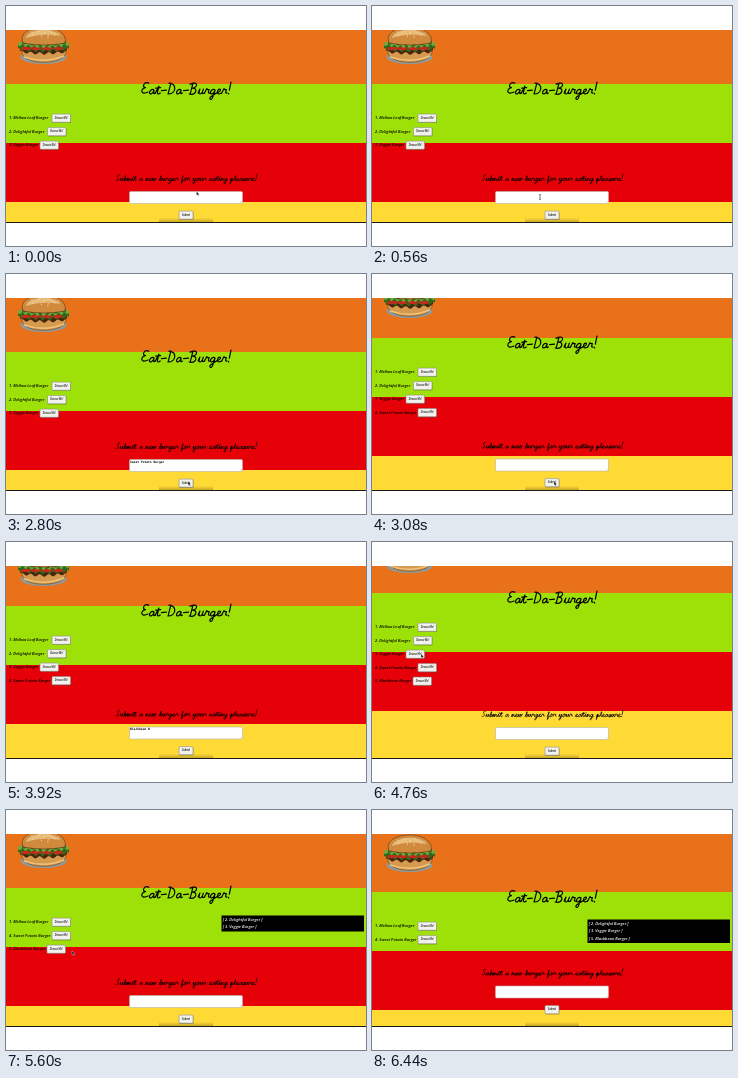
An HTML page with a canvas that plays this animation: 360x240 px, repeating every 6720 ms.

```html
<!DOCTYPE html>
<html lang="en">
<head>
<meta charset="utf-8">
<title>Eat-Da-Burger!</title>
<style>
  html, body { margin: 0; width: 100%; height: 100%; overflow: hidden; background: #fff; }
  canvas { display: block; width: 100vw; height: 100vh; }
</style>
</head>
<body>
<canvas id="stage" role="img" aria-label="Eat-Da-Burger! Submit a new burger for your eating pleasure!"></canvas>
<script>
const W = 360, H = 240, STEP = 280, STEPS = 24;
const ROW = 13.5;
const canvas = document.getElementById('stage');
const ctx = canvas.getContext('2d');
const dpr = window.devicePixelRatio || 1;
canvas.width = W * dpr;
canvas.height = H * dpr;

const SANS = '"Open Sans", "Noto Sans", sans-serif';
const MONO = '"DejaVu Sans Mono", monospace';

// Each burger is listed from step "from" and devoured at step "to".
const burgers = [
  { name: 'Mellow Leaf Burger', x: 46, from: 0, to: 99 },
  { name: 'Delightful Burger', x: 41.5, from: 0, to: 20 },
  { name: 'Veggie Burger', x: 34, from: 0, to: 18 },
  { name: 'Sweet Potato Burger', x: 46, from: 11, to: 99 },
  { name: 'Blackbean Burger', x: 41, from: 17, to: 22 }
].map((b, i) => ({ ...b, label: `${i + 1}. ${b.name}` }));

// Pen strokes of the handwriting: x-height 5, capitals 12, baseline 0.
const cup = 'M0-1L1.5-5Q0 0 2 0';
const bowl = 'M5-4C3-6 0-3 .6-1S4 0 5-4';
const tail = 'L3 4C2 7-1 5 1 3L6.5-1';
const rise = 'M0-1C4-5 4-11 2.5-9';
const hump = 'M0-1L1.5-5L1 0Q4-7 4.5-4';
const pen = {
  a: [6.5, bowl + 'Q4 1 6.5-1'],
  b: [5.5, rise + 'L1.5 0C5 1 5-5 3-4L5.5-3'],
  e: [5.5, 'M0-1C4-2 5-5 3-5S0 0 3 0L5.5-1'],
  f: [5, rise + 'L1 5Q4 2 2 0L5-1'],
  g: [6.5, bowl + tail],
  i: [4, 'M0-1L2-5Q0 1 4-1M2.5-7.2v.5'],
  l: [4, rise + 'Q0 1 4-1'],
  m: [9, hump + 'L3.5 0Q6-7 7-4Q5 1 9-1'],
  n: [6, hump + 'Q3 1 6-1'],
  o: [6, 'M3-5C0-5 0 0 2 0S5-4 3-5Q5-3 6-4'],
  p: [6, 'M0-1L2-5L.5 5L2-4C6-6 5 1 1.5-1L6-1'],
  r: [5.5, 'M0-1L2-5.5Q2.5-4 4.5-4.5Q3 0 5.5-1'],
  s: [5, 'M0-1L3-5Q5 1 1 0L5-1'],
  t: [5, 'M0-1L3-8L2-1Q3 1 5-1M0-6L5-6.5'],
  u: [6.5, cup + 'T5-5Q3 1 6.5-1'],
  w: [8, cup + 'T4.5-5Q3 0 5 0T7-5L8-4'],
  y: [6.5, cup + 'T5-5' + tail],
  B: [9, 'M3-11L1 0M0-10C9-14 8-6 3-6C9-6 7 2 0 0'],
  D: [9, 'M3-11L1 0C9 0 10-10 1-11'],
  E: [8, 'M7-11C2-13 0-7 4-6.5C-1-6-1 2 7-2'],
  S: [7, 'M6-10C3-13 1-8 3-6S4 1 0-1'],
  '-': [7, 'M1-3.5L6-4'],
  '!': [4, 'M3-12L2-4M1.5-.6v.5'],
  ' ': [5, '']
};
for (const k in pen) pen[k] = { w: pen[k][0], path: new Path2D(pen[k][1]) };

function handwrite(str, cx, y, width, line) {
  const natural = [...str].reduce((sum, c) => sum + pen[c].w, 0);
  const k = width / natural;
  ctx.save();
  ctx.translate(cx - width / 2, y);
  ctx.transform(k, 0, -0.08 * k, k, 0, 0);
  ctx.strokeStyle = '#000';
  ctx.lineWidth = line / k;
  ctx.lineCap = ctx.lineJoin = 'round';
  for (const c of str) {
    ctx.stroke(pen[c].path);
    ctx.translate(pen[c].w, 0);
  }
  ctx.restore();
}

function rect(x, y, w, h, fill) {
  ctx.fillStyle = fill;
  ctx.fillRect(x, y, w, h);
}

function text(str, x, y, font, fill = '#000', align = 'left') {
  ctx.font = font;
  ctx.fillStyle = fill;
  ctx.textAlign = align;
  ctx.textBaseline = 'middle';
  ctx.fillText(str, x, y);
}

function box(x, y, w, h, r, fill, stroke) {
  ctx.beginPath();
  ctx.roundRect(x, y, w, h, r);
  ctx.fillStyle = fill;
  ctx.fill();
  ctx.strokeStyle = stroke;
  ctx.lineWidth = 0.6;
  ctx.stroke();
}

function button(label, x, y, w) {
  rect(x + 0.4, y + 0.6, w, 8.2, 'rgba(0,0,0,.3)');
  box(x, y, w, 8.2, 0.8, '#f1f1ee', '#8d8b86');
  text(label, x + w / 2, y + 4.2, `italic 600 2.5px ${SANS}`, '#111', 'center');
}

function shape(d, fill, stroke, line = 0.6) {
  const p = new Path2D(d);
  if (fill) { ctx.fillStyle = fill; ctx.fill(p); }
  if (stroke) { ctx.strokeStyle = stroke; ctx.lineWidth = line; ctx.stroke(p); }
}

function oval(x, y, rx, ry, fill, turn = 0) {
  ctx.beginPath();
  ctx.ellipse(x, y, rx, ry, turn, 0, 7);
  ctx.fillStyle = fill;
  ctx.fill();
}

// A layer of filling with a ruffled, sagging lower edge.
function ruffle(x0, x1, y, depth, period, fill) {
  ctx.beginPath();
  ctx.moveTo(x0, y);
  for (let x = x0; x <= x1; x += 0.5) {
    const sag = 2 * Math.sin(Math.PI * (x - x0) / (x1 - x0));
    ctx.lineTo(x, y + depth + sag + 1.2 * Math.sin(x * 2 * Math.PI / period));
  }
  ctx.lineTo(x1, y);
  ctx.closePath();
  ctx.fillStyle = fill;
  ctx.fill();
}

function drawBurger() {
  oval(37.5, 55, 23, 7, '#8f9a9c');
  shape('M16 49C14 64 61 64 60 49Z', '#d69a4e', '#6b4018');
  shape('M18 55Q38 62 58 54', null, '#efc27c', 1.4);
  ruffle(14, 61, 43, 6.5, 9, '#46250f');
  ruffle(12, 63, 42, 5, 7, '#2f6a1b');
  for (const x of [20, 30, 41, 52]) oval(x, 46.5, 5, 1.7, '#c42a1c');
  ruffle(12, 63, 40, 2.8, 6, '#74a83c');
  ruffle(16, 60, 39, 2, 8, '#33591a');
  shape('M17 41C13 31 24 25 38 25S61 32 59 41Q38 45 17 41Z', '#d08a3e', '#60350f');
  shape('M20 36C22 27 46 24 55 34Q37 30 20 36Z', '#e9bb78');
  for (let i = 0; i < 14; i++) {
    const a = i * 2.4, r = Math.sqrt(i / 14);
    oval(38 + 15 * r * Math.cos(a), 32 + 4 * r * Math.sin(a), 0.8, 0.4, '#f8e2b0', a);
  }
}

function drawEaten(list) {
  if (!list.length) return;
  rect(215.5, 109.5, 142.5, 1 + 7.5 * list.length, '#000');
  list.forEach((b, i) =>
    text(`[ ${b.label} ]`, 216.7, 113.8 + 7.5 * i, `italic 600 4px ${SANS}`, '#fff'));
}

function drawForm(y, typed) {
  handwrite('Submit a new burger for your eating pleasure!', 180.5, y - 0.7, 141, 0.7);
  box(123.5, y + 10, 113, 12, 1.2, '#fff', '#b5b2a8');
  shape(`M234.3 ${y + 21.3}l1.8-1.8`, null, '#999', 0.4);
  text(typed, 124, y + 12.6, `bold 3px ${MONO}`);
  button('Submit', 173, y + 29.6, 14);
}

function typedAt(s) {
  if (s < 11) {
    const n = s < 4 ? 0 : [2, 5, 10, 14][s - 4] ?? 19;
    return 'Sweet Potato Burger'.slice(0, n);
  }
  const n = s < 13 || s > 16 ? 0 : [5, 11, 16, 16][s - 13];
  return 'Blackbean Burger'.slice(0, n);
}

// Pointer stops: first step, last step, x, y, text beam or arrow.
const stops = [
  [0, 0, 190.5, 185.5], [1, 1, 180, 188], [2, 2, 168, 191, 'beam'],
  [3, 4, 166, 191, 'beam'], [5, 5, 165, 191, 'beam'],
  [9, 9, 182, 206], [10, 11, 182, 207.5], [12, 12, 175, 189, 'beam'],
  [15, 16, 182, 207.5], [17, 18, 49, 112], [19, 19, 51, 112],
  [20, 20, 66, 141], [21, 22, 50, 139]
];

function drawPointer(s) {
  const stop = stops.find(([a, b]) => s >= a && s <= b);
  if (!stop) return;
  const [, , x, y, kind] = stop;
  if (kind) shape(`M${x - 0.8} ${y - 2.4}h1.6m-.8 0v4.8m-.8 0h1.6`, null, '#222', 0.6);
  else shape(`M${x} ${y}v3.8l.9-.8l.7 1.5l.8-.4l-.7-1.4h1.2Z`, '#000', '#fff', 0.35);
}

// Soft shadow of the dock and the dark edge below the page.
function drawScreenEdge() {
  const shade = ctx.createLinearGradient(0, 212, 0, 216);
  shade.addColorStop(0, 'rgba(60,50,20,0)');
  shade.addColorStop(1, 'rgba(60,50,20,.3)');
  rect(153, 212, 54, 4, shade);
  rect(0, 216, W, 1, '#1d1b18');
}

function draw(s) {
  const left = burgers.filter(b => s >= b.from && s < b.to);
  const eaten = burgers.filter(b => s >= b.to);
  const growth = ROW * (left.length - 3);
  const scroll = Math.max(0, Math.round(4.3 + growth));

  ctx.setTransform(dpr, 0, 0, dpr, 0, 0);
  rect(0, 0, W, H, '#fff');
  ctx.save();
  ctx.beginPath();
  ctx.rect(0, 24, W, 192);
  ctx.clip();
  ctx.translate(0, -scroll);

  ['#e97119', '#9de108', '#e60008', '#ffd934'].forEach((c, i) =>
    rect(0, 23 + 59 * i, W, 59, c));
  drawBurger();
  handwrite('Eat-Da-Burger!', 180, 92, 90, 1.2);
  left.forEach((b, i) => {
    const y = 116.4 + ROW * i;
    text(b.label, 3, y, `italic 600 4px ${SANS}`);
    button('Devour Me!', b.x, y - 4.3, 18.5);
  });
  drawEaten(eaten);
  drawForm(179.5 + growth, typedAt(s));
  ctx.restore();

  drawScreenEdge();
  drawPointer(s);
}

let shown = -1;
function tick() {
  const s = Math.floor(performance.now() / STEP) % STEPS;
  if (s !== shown) draw(shown = s);
  requestAnimationFrame(tick);
}
tick();
</script>
</body>
</html>
```
